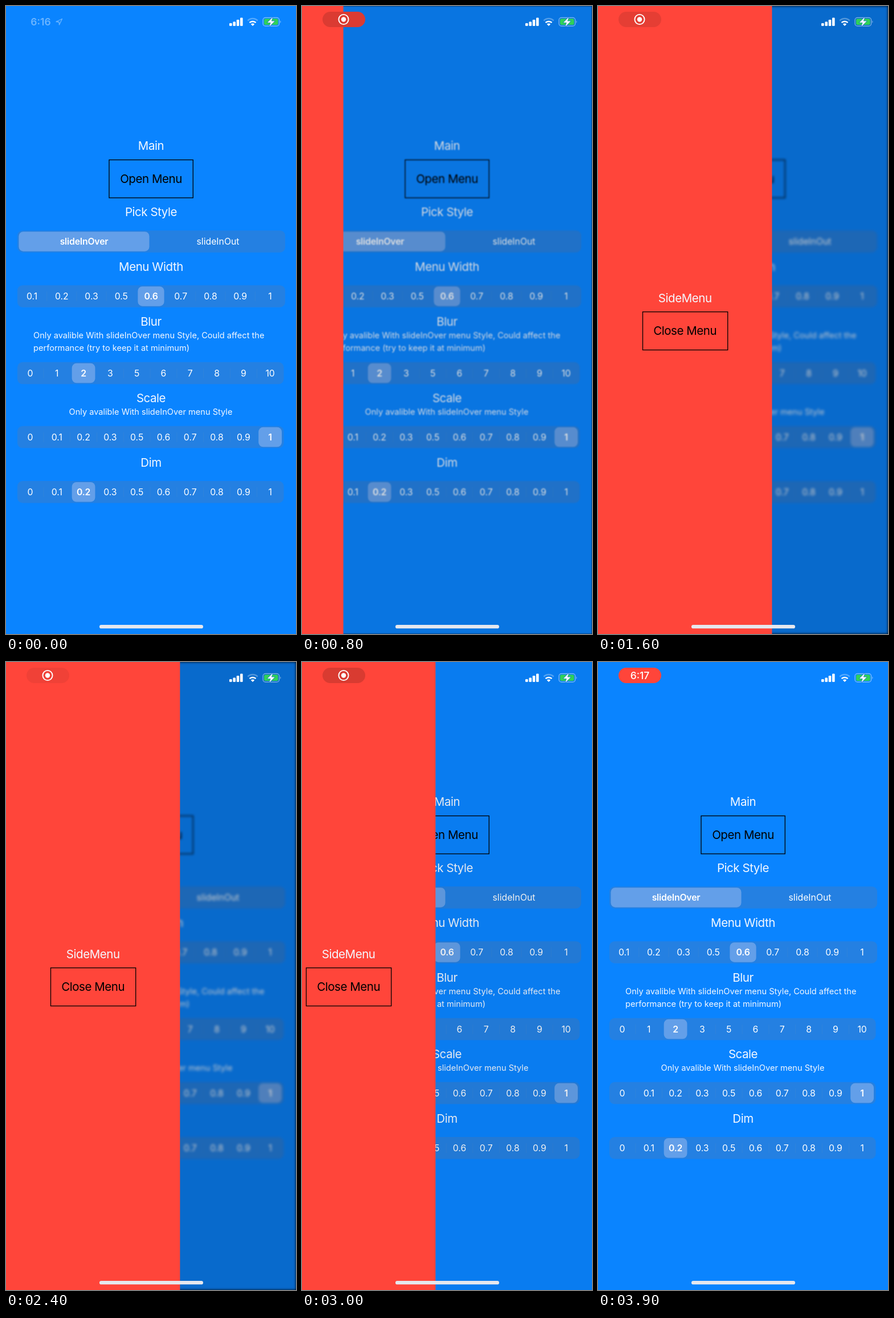
Animation of 509x1100 px, one loop 4000 ms. Source, as an HTML page:

```html
<!DOCTYPE html>
<html lang="en">
<head>
<meta charset="utf-8">
<title>Side menu</title>
<style>
  html, body { margin: 0; width: 100%; height: 100%; overflow: hidden; background: #000; }
  svg { position: absolute; left: 0; top: 0; width: 509px; height: 1100px; overflow: hidden; }
  text { font-family: Inter, Roboto, sans-serif; fill: #fff; text-anchor: middle; }
  .title { font-size: 20.5px; letter-spacing: -.45px; fill: #f4f8ff; }
  .button { font-size: 20.5px; letter-spacing: -.45px; fill: #000; }
  .note { font-size: 14.6px; text-anchor: start; fill: #f4f8ff; }
  .option { font-size: 15.8px; }
  .chosen { font-weight: 600; letter-spacing: -.2px; }
  .clock { font-size: 17.5px; font-weight: 500; }
  .frame { fill: none; stroke: #000; stroke-width: 1.3; }
</style>
</head>
<body>
<svg id="main"></svg>
<svg id="overlay">
  <rect id="dim" width="509" height="1100"/>
  <g id="menu"></g>
  <g id="oldClock">
    <text class="clock" x="61" y="34" style="font-weight:600">6:16</text>
    <path d="M88 27.5 98.500 22.500 93.500 33 93 28Z" fill="none" stroke="#fff" stroke-width="1.3" stroke-linejoin="round"/>
  </g>
  <g id="pill">
    <rect x="36" y="10" width="75" height="27" rx="13.5" fill="#ff453a"/>
    <rect id="shade" x="36" y="10" width="75" height="27" rx="13.5"/>
    <g id="record">
      <circle cx="73" cy="23.5" r="8.6" fill="none" stroke="#fff" stroke-width="1.9"/>
      <circle cx="73" cy="23.5" r="4.2" fill="#fff"/>
    </g>
    <text id="newClock" class="clock" x="73.500" y="30">6:17</text>
  </g>
  <g fill="#fff">
    <rect x="392" y="30" width="4.600" height="5" rx="1.2"/>
    <rect x="398.400" y="27.500" width="4.600" height="7.500" rx="1.2"/>
    <rect x="404.700" y="24" width="4.600" height="11" rx="1.2"/>
    <rect x="411" y="20.500" width="4.600" height="14.500" rx="1.2"/>
    <path d="M433 35 429.800 31.700A4.600 4.600 0 0 1 436.200 31.700Z"/>
  </g>
  <g fill="none" stroke="#fff" stroke-width="2.500">
    <path d="M427.500 29.200A7.800 7.800 0 0 1 438.500 29.200"/>
    <path d="M424.300 25.600A12.300 12.300 0 0 1 441.700 25.600" opacity=".3"/>
  </g>
  <rect x="451" y="20.300" width="28.600" height="14.800" rx="4.300" fill="none" stroke="#fff" stroke-opacity=".5" stroke-width="1.2"/>
  <rect x="453" y="22.300" width="24.600" height="10.800" rx="2.500" fill="#30d158"/>
  <path d="M481.300 25.500Q483.600 27.700 481.300 30Z" fill="#fff" opacity=".5"/>
  <path d="M468.200 19.500 459 29H464.600L462.200 36 471.500 26.400H465.800Z" fill="#fff" stroke="#1673d0" stroke-width="1.2" paint-order="stroke"/>
  <rect x="164" y="1084" width="182" height="6.300" rx="3.150" fill="#e6e8ee"/>
</svg>
<script>
const $ = id => document.getElementById(id);
const MENU_WIDTH = 305.4;

const text = (cls, x, y, s) => `<text class="${cls}" x="${x}" y="${y}">${s}</text>`;
const box = (x, y, w, h, attrs) => `<rect x="${x}" y="${y}" width="${w}" height="${h}" ${attrs}/>`;

// Segmented control: y is the top edge, gap the inset of the selected cell.
function segments(y, left, right, labels, selected, gap = 3) {
  const cell = (right - left) / labels.length;
  let out = box(20, y, right - 19.5, 38.5, 'rx="9" fill="#2480e2"');
  labels.forEach((label, i) => {
    const x = left + i * cell;
    const on = i === selected;
    if (on) out += box(x + gap, y + 2, cell - 2 * gap, 34.5, 'rx="8" fill="#639fe9"');
    else if (i && i - 1 !== selected) out += box(x - .5, y + 11, 1, 17, 'fill="#3a86d6" opacity=".6"');
    out += text(on ? 'option chosen' : 'option', x + cell / 2, y + 25, label);
  });
  return out;
}

const fractions = '0 0.1 0.2 0.3 0.5 0.6 0.7 0.8 0.9 1'.split(' ');
const titles = [['Main', 252], ['Pick Style', 367.5], ['Menu Width', 464],
  ['Blur', 560], ['Scale', 694], ['Dim', 806.5]];

$('main').innerHTML =
  box(0, 0, 509, 1100, 'fill="#0a84ff"') +
  titles.map(([s, y]) => text('title', 254.5, y, s)).join('') +
  box(181, 269.5, 147.3, 66.5, 'class="frame"') +
  text('button', 254.5, 310, 'Open Menu') +
  segments(393.2, 19.5, 489.5, ['slideInOver', 'slideInOut'], 0) +
  segments(489.2, 19.5, 489.5, fractions.slice(1), 4) +
  text('note', 48, 582, 'Only avalible With slideInOver menu Style, Could affect the') +
  text('note', 48, 604, 'performance (try to keep it at minimum)') +
  segments(623.8, 19.1, 487, '0 1 2 3 5 6 7 8 9 10'.split(' '), 2) +
  text('note', 110.5, 716, 'Only avalible With slideInOver menu Style') +
  segments(735.8, 19.1, 487, fractions, 9) +
  segments(832, 19.1, 487, fractions, 2);

$('menu').innerHTML =
  box(0, 0, MENU_WIDTH, 1100, 'fill="#ff453a"') +
  text('title', MENU_WIDTH / 2, 518.5, 'SideMenu') +
  box(78.5, 535.7, 149.2, 66.8, 'class="frame"') +
  text('button', MENU_WIDTH / 2, 576, 'Close Menu');

const ramp = (t, start, length) => Math.min(1, Math.max(0, (t - start) / length));
const ease = (t, start, length) => {
  const u = ramp(t, start, length);
  return u * u * (3 - 2 * u);
};

// Pulse of the recording pill: [time, darkness]
const pulse = [[0, .1], [800, .14], [1100, .13], [2400, .06], [3000, .15], [3300, .1], [3700, 0], [4000, 0]];
function darkness(t) {
  const i = pulse.findIndex(([time]) => time > t);
  const [t0, a] = pulse[i - 1], [t1, b] = pulse[i];
  return a + (b - a) * (t - t0) / (t1 - t0);
}

function draw(now) {
  const t = now % 4000;
  const slide = ease(t, 602, 628) - ease(t, 2795, 658);
  const cover = ease(t, 602, 360) - ease(t, 2795, 320);
  const toClock = ramp(t, 3150, 165);

  $('menu').setAttribute('transform', `translate(${(slide - 1) * MENU_WIDTH} 0)`);
  $('main').style.filter = cover > 0 ? `blur(${2 * cover}px)` : 'none';
  $('dim').style.opacity = .2 * cover;
  $('oldClock').style.opacity = .4 * (1 - ramp(t, 100, 100));
  $('pill').style.opacity = ramp(t, 100, 200);
  $('shade').style.opacity = darkness(t);
  $('record').style.opacity = 1 - toClock;
  $('newClock').style.opacity = toClock;
  requestAnimationFrame(draw);
}
requestAnimationFrame(draw);
</script>
</body>
</html>
```
